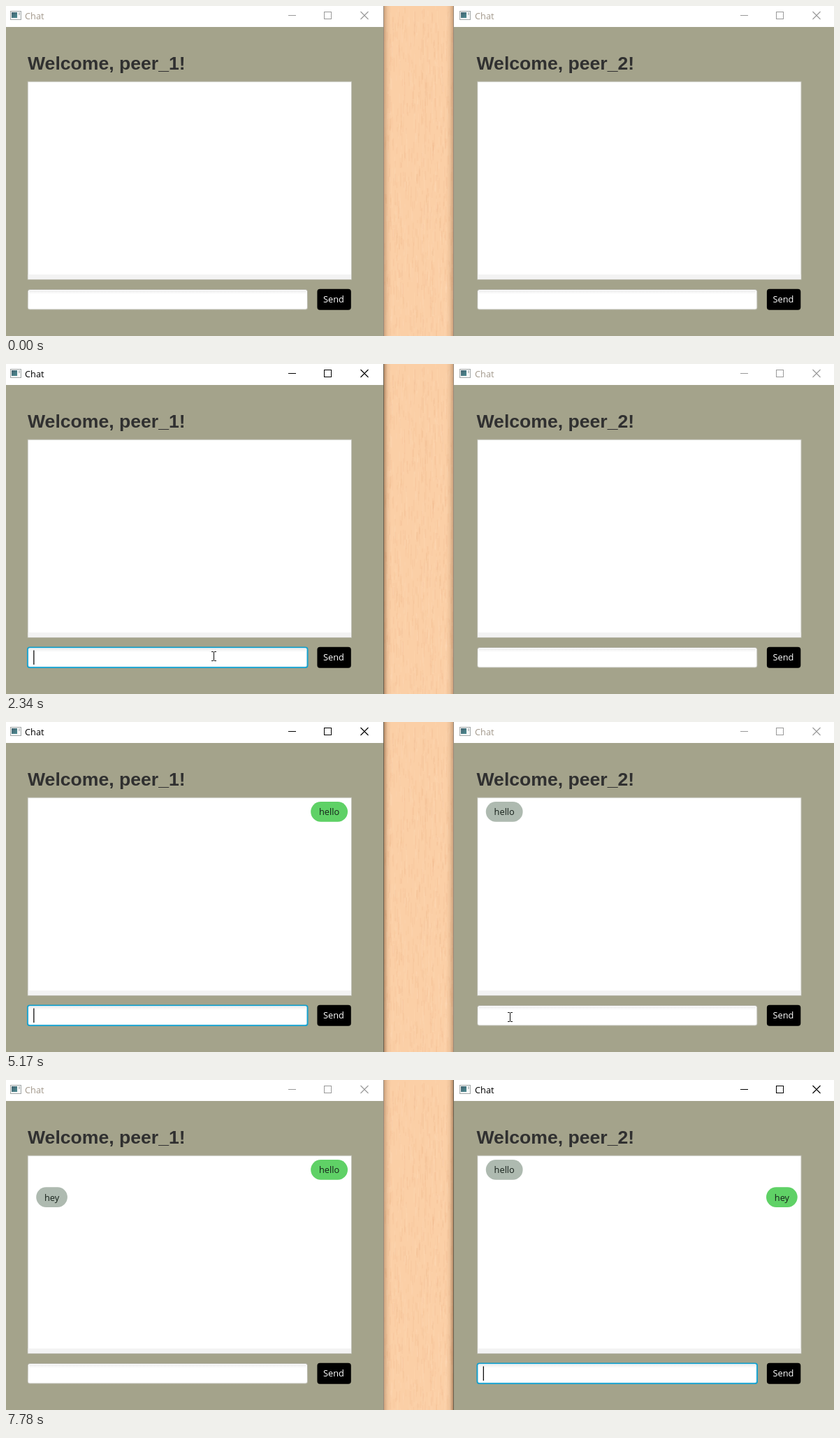
Animation of 1185 by 472 pixels, one loop 8 s. Source, as an HTML page with a canvas:

```html
<!DOCTYPE html>
<html lang="en">
<head>
<meta charset="utf-8">
<title>Chat</title>
<style>
  html, body { margin: 0; width: 100%; height: 100%; overflow: hidden; background: #a4a38b; }
  canvas { display: block; }
</style>
</head>
<body>
<canvas id="stage" width="1185" height="472"></canvas>
<script>
const W = 1185, H = 472, LOOP = 8000;
const ctx = document.getElementById('stage').getContext('2d');
const UI = '12.8px "Open Sans", "Noto Sans", sans-serif';
const HEAD = 'bold 26.6px "Liberation Sans", Arial, sans-serif';
const GREEN = '#5fd166', GREY = '#aebab0', OLIVE = '#a4a38b';

// Left and right window: x offsets of the client area, heading and title bar
const left = { x: 0, dx: 0, headX: 31, iconX: 6, titleX: 27, btnX: 0, name: 'peer_1' };
const right = { x: 641, dx: 643.5, headX: 673.5, iconX: 649, titleX: 671, btnX: 647, name: 'peer_2' };

// [time, typed text] and [time, caret visible]
const typedLeft = [[0, ''], [2550, 'h'], [2760, 'he'], [2960, 'hel'], [3080, 'hell'], [3280, 'hello'], [3790, '']];
const typedRight = [[0, ''], [6760, 'h'], [6960, 'he'], [7010, 'hey'], [7780, '']];
const caretLeft = [[0, 0], [1380, 1], [1830, 0], [2340, 1], [4250, 0], [4750, 1], [5250, 0]];
const caretRight = [[0, 0], [5580, 1], [6050, 0], [6550, 1], [7530, 0], [7780, 1]];

// Small pointer shifts while it rests: [time, x, y]
const rests = [[1150, 297, 421], [1380, 305, 425], [1430, 303, 414], [1530, 297, 417], [1730, 297, 418]];
const leaves = [[5150, 721, 421.5], [5490, 721, 425], [5530, 721, 429], [5580, 721, 431]];

const latest = (list, t) => list.reduce((a, b) => (b[0] <= t ? b : a));

function rect(x, y, w, h, fill) {
  ctx.fillStyle = fill;
  ctx.fillRect(x, y, w, h);
}

function round(x, y, w, h, r, fill) {
  ctx.fillStyle = fill;
  ctx.beginPath();
  ctx.roundRect(x, y, w, h, r);
  ctx.fill();
}

function line(color, width, ...segments) {
  ctx.strokeStyle = color;
  ctx.lineWidth = width;
  ctx.beginPath();
  for (const [x1, y1, x2, y2] of segments) {
    ctx.moveTo(x1, y1);
    ctx.lineTo(x2, y2);
  }
  ctx.stroke();
}

function label(text, x, y, color, font = UI) {
  ctx.font = font;
  ctx.fillStyle = color;
  ctx.fillText(text, x, y);
}

function fade(x1, y1, x2, y2, ...colors) {
  const g = ctx.createLinearGradient(x1, y1, x2, y2);
  colors.forEach((c, i) => g.addColorStop(i / (colors.length - 1), c));
  return g;
}

function makeDesk() {
  const desk = document.createElement('canvas');
  desk.width = 100;
  desk.height = H;
  const d = desk.getContext('2d');
  let seed = 7;
  const rnd = () => (seed = (seed * 16807) % 2147483647) / 2147483647;
  d.fillStyle = '#fbcfa6';
  d.fillRect(0, 0, 100, H);
  for (let i = 0; i < 1100; i++) {
    d.fillStyle = rnd() < 0.55 ? 'rgba(226,170,122,.13)' : 'rgba(255,224,190,.16)';
    d.fillRect(rnd() * 100, rnd() * H, 1 + rnd(), 4 + rnd() * 18);
  }
  return desk;
}
const desk = makeDesk();

function drawDesk(leftActive, rightActive) {
  ctx.drawImage(desk, 541, 0);
  const tone = on => `rgba(90,50,20,${on ? 0.42 : 0.28})`;
  const edge = on => (on ? '#69604f' : '#98897a');
  rect(541, 0, 10, H, fade(541, 0, 551, 0, tone(leftActive), 'rgba(90,50,20,.08)', 'rgba(90,50,20,0)'));
  rect(630, 0, 10, H, fade(640, 0, 630, 0, tone(rightActive), 'rgba(90,50,20,.08)', 'rgba(90,50,20,0)'));
  rect(540, 0, 1, H, edge(leftActive));
  rect(640, 0, 1, H, edge(rightActive));
}

function drawIcon(x) {
  rect(x, 7, 16, 13, '#a3a8a8');
  rect(x + 1, 8, 14, 11, '#f5f6f6');
  rect(x + 2, 9, 8, 8, fade(x + 2, 9, x + 10, 17, '#42626f', '#4d8c92'));
  rect(x + 12, 9, 2, 4, '#c3c9ca');
}

function drawTitle(win, active) {
  rect(win.x, 0, win.x ? W - win.x : 540, 30, '#fff');
  drawIcon(win.iconX);
  label('Chat', win.titleX, 18.5, active ? '#000' : '#a3998c');
  const b = win.btnX, c = active ? '#000' : '#999';
  line(c, 1, [b + 404, 13.5, b + 415, 13.5]);
  ctx.strokeRect(b + 455.5, 8.5, 10, 10);
  line(c, 1.1, [b + 507.5, 8, b + 518.5, 19], [b + 518.5, 8, b + 507.5, 19]);
}

function drawField(x, focused, text, caret) {
  if (focused) {
    round(x + 30, 404.4, 402.5, 30.6, 4, '#0f9fce');
    round(x + 31.7, 406.1, 399, 27.2, 2.5, '#d3ebf4');
    round(x + 32.7, 407, 397, 25.4, 2, '#fff');
  } else {
    round(x + 30.7, 405, 401.2, 29.5, 3.5, fade(0, 405, 0, 434, '#aeaea2', '#c0c0b6'));
    round(x + 31.7, 406, 399.2, 27.5, 2.5, '#fff');
  }
  rect(x + 33, 407, 396.5, 5, fade(0, 407, 0, 412, '#ededed', '#fff'));
  label(text, x + 40, 424, '#222');
  if (caret) rect(x + 40 + ctx.measureText(text).width - 0.8, 409.5, 1.3, 20.5, '#111');
}

function drawBubble(x, y, w, text, color) {
  round(x, y, w, 28.7, 14.3, color);
  label(text, x + 11.8, y + 19.4, '#16201a');
}

function drawWindow(win, active, focused, text, caret) {
  const x = win.dx;
  rect(win.x, 30, win.x ? W - win.x : 540, H - 30, OLIVE);
  drawTitle(win, active);
  label(`Welcome, ${win.name}!`, win.headX, 91, '#303030', HEAD);
  rect(x + 30.7, 107.7, 464.3, 284, '#bebeb4');
  rect(x + 31.7, 108.7, 462.3, 282, '#fff');
  rect(x + 31.7, 384, 462.3, 6.7, '#f3f3f3');
  drawField(x, focused, text, caret);
  round(x + 445.4, 404.8, 48.4, 30, 4, '#000');
  label('Send', x + 454, 424, '#fff');
}

function drawMessages(t) {
  if (t >= 3790) {
    drawBubble(436.2, 114, 52.8, 'hello', GREEN);
    drawBubble(686.8, 114, 52.8, 'hello', GREY);
  }
  if (t >= 7780) {
    drawBubble(43.2, 153.2, 44.7, 'hey', GREY);
    drawBubble(1088, 153.2, 44.7, 'hey', GREEN);
  }
}

function drawShadow(t) {
  if (t < 6450 || t >= 6760) return;
  ctx.save();
  ctx.beginPath();
  ctx.rect(815, 462, 180, 10);
  ctx.clip();
  ctx.translate(905, 474);
  ctx.scale(1, 0.13);
  const g = ctx.createRadialGradient(0, 0, 20, 0, 0, 88);
  g.addColorStop(0, 'rgba(50,48,30,.42)');
  g.addColorStop(0.6, 'rgba(50,48,30,.25)');
  g.addColorStop(1, 'rgba(50,48,30,0)');
  ctx.fillStyle = g;
  ctx.fillRect(-90, -90, 180, 180);
  ctx.restore();
}

function bezier(p, points) {
  const q = 1 - p, k = [q * q * q, 3 * q * q * p, 3 * q * p * p, p * p * p];
  return [0, 1].map(axis => points.reduce((sum, pt, i) => sum + k[i] * pt[axis], 0));
}

// The pointer was sampled about every 50 ms
function travel(t, start, end, points) {
  const stepped = Math.floor((t - start) / 50 + 1) * 50;
  const p = Math.min(1, stepped / (end - start));
  return bezier(p * (1.6 - 0.6 * p), points);
}

function pointerAt(t) {
  if (t < 460 || t >= 5630) return null;
  if (t < 1150) return travel(t, 460, 1150, [[440, 475], [370, 385], [300, 375], [297, 420]]);
  if (t < 4650) return latest(rests, t).slice(1);
  if (t < 5150) return travel(t, 4650, 5150, [[297, 418], [420, 395], [700, 350], [721, 421.5]]);
  return latest(leaves, t).slice(1);
}

function drawPointer(t) {
  const at = pointerAt(t);
  if (!at) return;
  const [x, y] = at.map(Math.round);
  const overField = y > 404 && y < 435 && ((x > 30 && x < 432) || (x > 674 && x < 1076));
  if (overField) {
    line('#1a1a1a', 1.1, [x + 0.5, y - 6, x + 0.5, y + 6],
      [x - 3, y - 6.5, x, y - 6.5], [x + 1, y - 6.5, x + 4, y - 6.5],
      [x - 3, y + 6.5, x, y + 6.5], [x + 1, y + 6.5, x + 4, y + 6.5]);
    return;
  }
  const outline = [[0, 0], [0, 16], [4, 12.5], [6.5, 18], [9, 17], [6.5, 11.5], [11.5, 11.5]];
  ctx.beginPath();
  outline.forEach(([dx, dy]) => ctx.lineTo(x + dx + 0.5, y + dy + 0.5));
  ctx.closePath();
  ctx.fillStyle = '#fff';
  ctx.fill();
  ctx.strokeStyle = '#000';
  ctx.lineWidth = 1;
  ctx.stroke();
}

function draw(t) {
  const leftActive = t >= 1230 && t < 5430, rightActive = t >= 5430;
  const leftFocus = t >= 1230 && t < 5490, rightFocus = t >= 5490;
  drawWindow(left, leftActive, leftFocus, latest(typedLeft, t)[1], leftFocus && latest(caretLeft, t)[1]);
  drawWindow(right, rightActive, rightFocus, latest(typedRight, t)[1], rightFocus && latest(caretRight, t)[1]);
  drawDesk(leftActive, rightActive);
  drawMessages(t);
  drawShadow(t);
  drawPointer(t);
}

const begin = performance.now();
function tick() {
  draw((performance.now() - begin) % LOOP);
  requestAnimationFrame(tick);
}
tick();
</script>
</body>
</html>
```
